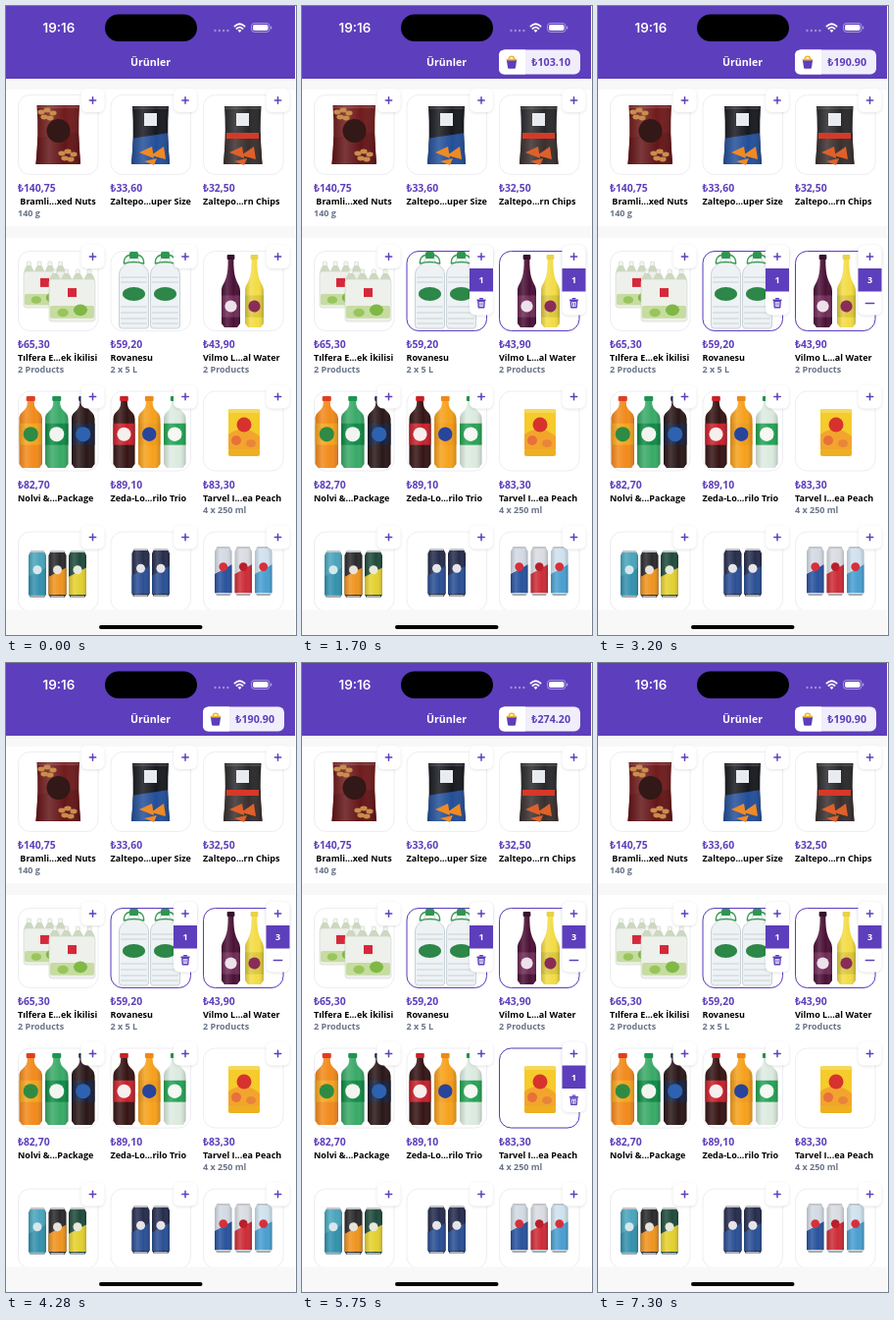
Animation, 296 px wide and 640 px high, one loop 8000 ms. Source, as an HTML page:

```html
<!DOCTYPE html>
<html lang="tr">
<head>
<meta charset="utf-8">
<style>
html, body { margin: 0; width: 100%; height: 100%; overflow: hidden; background: #fff; }
svg { display: block; width: 296px; height: 640px; }
text { font: 700 9px "Open Sans", "Noto Sans", sans-serif; }
.price { font-size: 10.4px; fill: #5d3ebc; }
.title { font-size: 10.6px; fill: #fff; }
.total { font-size: 10.7px; text-anchor: end; }
.sub { fill: #697488; }
.clock { font: 600 13.4px Inter, sans-serif; fill: #fff; }
.mid { text-anchor: middle; }
.lift { filter: drop-shadow(0 1px 1.5px #0000001c); }
</style>
</head>
<body>
<svg viewBox="0 0 296 640"><g id="page"></g><g id="cart"></g></svg>
<script>
const PURPLE = '#5d3ebc', PALE = '#f8f8f9';
const LOOP = 8000, WIDTH = 295;
const COLS = [12, 106.5, 201], ROWS = [90, 249, 391.5, 534.5];

const rect = (x, y, w, h, fill, r = 0, more = '') =>
  `<rect x="${x}" y="${y}" width="${w}" height="${h}" rx="${r}" fill="${fill}" ${more}/>`;
const oval = (x, y, rx, ry, fill) =>
  `<ellipse cx="${x}" cy="${y}" rx="${rx}" ry="${ry}" fill="${fill}"/>`;
const path = (d, fill, more = '') => `<path d="${d}" fill="${fill}" ${more}/>`;
const line = (d, color, w, more = '') =>
  path(d, 'none', `stroke="${color}" stroke-width="${w}" stroke-linecap="round" ${more}`);
const text = (x, y, s, cls) => `<text x="${x}" y="${y}" class="${cls}">${s}</text>`;

// Soft sheen laid over a shape's own colour
const shaded = d => path(d, 'url(#sheen)');

// The shoulder is the part of the height at which the body reaches full width
function bottle(x, y, w, h, shoulder, body, label, cap, mark) {
  const c = x + w / 2, n = w * .15, r = x + w, b = y + h, s = y + h * shoulder;
  const d = `M${c - n} ${y + 4}V${y + h * .09}C${c - n} ${s - h * .1} ${x} ${s - h * .12} ${x} ${s}
    V${b - 4}L${x + 3} ${b}H${r - 3}L${r} ${b - 4}V${s}C${r} ${s - h * .12} ${c + n} ${s - h * .1} ${c + n} ${y + h * .09}V${y + 4}Z`;
  const top = s + h * .06, tall = h * .3;
  return path(d, body) + rect(x, top, w, tall, label) + shaded(d) +
    rect(c - n - 1, y, n * 2 + 2, 5, cap, 1) + oval(c, top + tall / 2, w * .32, w * .32, mark);
}
const soda = (x, w, ...colors) => bottle(x, 397, w, 73, .32, ...colors);
const slim = (x, ...colors) => bottle(x, 253, 19, 74, .5, ...colors);

function can(x, y, w, h, top, base, mark) {
  const b = y + h;
  const d = `M${x + 2} ${y}H${x + w - 2}L${x + w} ${y + 4}V${b - 3}L${x + w - 2} ${b}H${x + 2}L${x} ${b - 3}V${y + 4}Z`;
  return path(d, top) + path(`M${x} ${y + h * .55}L${x + w} ${y + h * .35}V${b - 3}H${x}Z`, base) + shaded(d) +
    rect(x + 2, y - 1, w - 4, 2, '#c3c6ca', .5) + rect(x + 2, b - 2, w - 4, 2, '#a9adb2', .5) +
    oval(x + w / 2, y + h * .4, w * .25, w * .25, mark);
}

function pouch(x, y, w, h, body, low) {
  const r = x + w, b = y + h;
  const d = `M${x + 1} ${y}H${r - 1}Q${r - 3} ${y + h / 2} ${r} ${b}Q${x + w / 2} ${b - 1} ${x} ${b}
    Q${x + 3} ${y + h / 2} ${x + 1} ${y}Z`;
  return path(d, body) + path(`M${x + 2} ${y + h * .55}L${r - 2} ${y + h * .46}L${r} ${b}H${x}Z`, low) +
    shaded(d) + line(`M${x + 2} ${y + 2}H${r - 2}`, '#ffffff40', 1);
}

function jug(x, y) {
  const d = `M${x + 11} ${y + 5}H${x + 19}C${x + 20} ${y + 15} ${x + 30} ${y + 13} ${x + 30} ${y + 24}
    V${y + 75}Q${x + 30} ${y + 78} ${x + 27} ${y + 78}H${x + 3}Q${x} ${y + 78} ${x} ${y + 75}
    V${y + 24}C${x} ${y + 13} ${x + 10} ${y + 15} ${x + 11} ${y + 5}Z`;
  const ribs = [26, 31, 56, 62, 68, 73].map(k => line(`M${x + 2} ${y + k}H${x + 28}`, '#c3ced4', .9)).join('');
  return path(d, '#eef2f4', 'stroke="#bcc8ce" stroke-width=".8"') + ribs +
    line(`M${x + 5} ${y + 12}Q${x + 4} ${y + 3} ${x + 15} ${y + 3}T${x + 25} ${y + 12}Q${x + 15} ${y + 9} ${x + 5} ${y + 12}`, '#3b9b55', 1.5) +
    rect(x + 10.5, y, 9, 7, '#2f9550', 1.5) + oval(x + 15, y + 43, 11.5, 7, '#2c8748');
}

function pack(x, y, w, h) {
  const bw = w / 4;
  let s = '';
  for (let i = 0; i < 4; i++) {
    const c = x + (i + .5) * bw;
    s += rect(c - 2, y, 4, 5, '#f4f4f0', 1, 'stroke="#c3cbbd" stroke-width=".5"') +
      path(`M${c - 2} ${y + 4}Q${c - bw / 2} ${y + 8} ${c - bw / 2} ${y + 14}h${bw}Q${c + bw / 2} ${y + 8} ${c + 2} ${y + 4}Z`, '#ccd8bf');
  }
  return s + rect(x, y + 10, w, h - 10, '#eef0eb', 3, 'stroke="#cfd5c9" stroke-width=".6"') +
    rect(x + 1, y + h * .7, w - 2, h * .24, '#c6dca0', 2) +
    oval(x + w * .68, y + h * .78, w * .15, h * .11, '#7fb845') +
    oval(x + w * .3, y + h * .83, w * .12, h * .08, '#98c55c') +
    rect(x + w / 2 - 4.5, y + h * .36, 9, 9, '#d5283a');
}

const nuts = (x, y) => [[0, 0], [6, -2], [12, 1], [3, 5], [9, 6]]
  .map(([a, b]) => oval(x + a, y + b, 3.6, 2.4, '#c98d4d')).join('');
const chips = (x, y, color) =>
  path(`M${x} ${y}l13 -6 2 12zM${x + 12} ${y + 3}l13 -9 2 13zM${x + 5} ${y + 9}l13 -3 -3 7z`, color);

const PHOTOS = [
  () => pouch(30.5, 101, 45.5, 60, '#701b1c', '#641517') + nuts(36, 108) + nuts(57, 150) + oval(53.5, 127, 12, 12, '#321817'),
  () => pouch(128, 102, 39, 59, '#17191f', '#234f99') + rect(141, 109, 13, 13, '#e8ebef') + chips(136, 149, '#ef8a25'),
  () => pouch(222, 102, 39.5, 59, '#29282b', '#39302f') + rect(235, 109, 13, 13, '#e8ebef') +
    rect(225, 129, 33, 6, '#d63928') + chips(228, 149, '#e0602a'),
  () => pack(18, 260, 43, 47) + pack(44, 268, 47, 53),
  () => jug(115.5, 250) + jug(147.5, 250),
  () => slim(220, '#4a1036', '#6f2a55', '#35142b', '#ede2eb') + slim(244, '#f3dc45', '#dcc83c', '#e9d24a', '#8a2c58'),
  () => soda(13.5, 23.5, '#f28a1c', '#f6a41d', '#e23c22', '#2f8b43') +
    soda(40, 23.5, '#3aaa68', '#0f8a45', '#1e9553', '#f2f5ef') +
    soda(67, 23.5, '#2a1718', '#17203a', '#1c2d52', '#2d62b2'),
  () => soda(109.5, 22, '#351414', '#c9202a', '#ca2026', '#f7eeee') +
    soda(135, 22.5, '#f6a11c', '#f39a18', '#ef8818', '#27459b') +
    soda(161, 22.5, '#dcebe0', '#25a354', '#24974a', '#f6f8f3'),
  () => rect(227, 411, 32, 47, '#f6cb2c', 3) + path('M227 436Q243 424 259 438V451H227Z', '#f2a52d') +
    oval(235, 442, 5, 5, '#e8703a') + oval(250, 445, 5, 4, '#e8853a') +
    rect(227, 451, 32, 7, '#eeb021', 2) + rect(226.5, 410, 33, 4, '#f4d95c', 2) + oval(243, 426, 7.5, 7.5, '#d8322e'),
  () => can(23, 555, 18, 47, '#4aa5bd', '#3391ad', '#d8e8ec') + can(43.5, 555, 18, 47, '#2a2a2d', '#f0941f', '#e8e3da') +
    can(64, 555, 18, 47, '#204a3b', '#e4d02f', '#e7eadb'),
  () => [128.5, 149].map(x => can(x, 553, 18, 48, '#262d4c', '#2a4f94', '#e7e5e9')).join(''),
  () => can(213, 551, 17.5, 49, '#d3dae4', '#28539e', '#d7303b') + can(233.5, 551, 17.5, 49, '#d9dde3', '#cd2c37', '#b91f2c') +
    can(254, 551, 17.5, 49, '#cfe2ee', '#4a9fd0', '#d7303b')
];

const GOODS = [
  ['140,75', '&#160;Bramli...xed Nuts', '140 g'], ['33,60', 'Zaltepo...uper Size'], ['32,50', 'Zaltepo...rn Chips'],
  ['65,30', 'Tılfera E...ek İkilisi', '2 Products'], ['59,20', 'Rovanesu', '2 x 5 L'], ['43,90', 'Vilmo L...al Water', '2 Products'],
  ['82,70', 'Nolvi &amp;...Package'], ['89,10', 'Zeda-Lo...rilo Trio'], ['83,30', 'Tarvel I...ea Peach', '4 x 250 ml']
];

const plus = (x, y) => line(`M${x - 3.2} ${y}h6.4M${x} ${y - 3.2}v6.4`, PURPLE, 1.5);
const spot = i => [COLS[i % 3], ROWS[i / 3 | 0]];
const frame = (x, y, color) =>
  rect(x + .5, y + .5, 81.5, 81, 'none', 12, `stroke="${color}" stroke-width="1"`);

function product(i) {
  const [x, y] = spot(i), [price, name, sub] = GOODS[i] || [];
  let s = frame(x, y, '#eeedf2') + PHOTOS[i]() +
    rect(x + 64.5, y - 6, 24, 24, '#fff', 6, 'class="lift"') + plus(x + 76.5, y + 6);
  if (price) s += text(x, y + 99, '₺' + price, 'price') + text(x, y + 112, name, '');
  if (sub) s += text(x, y + 124, sub, 'sub');
  return s;
}

function header() {
  const dots = [213.5, 217.8, 222.1, 226.4].map(x => oval(x, 25, 1.2, 1.2, '#ffffff66')).join('');
  const wifi = line('M233.4 20.6Q238.5 15.8 243.6 20.6M235.4 23Q238.5 20.2 241.6 23', '#fff', 1.8) +
    path('M238.5 27l-2 -2.3q2 -1.4 4 0z', '#fff');
  const battery = rect(250.5, 17.5, 18.5, 9, 'none', 3, 'stroke="#ffffff80" stroke-width=".9"') +
    rect(252, 19, 15.5, 6, '#fff', 1.8) + rect(270, 20.5, 1.2, 3, '#ffffff80', .6);
  return rect(0, 0, WIDTH, 74, PURPLE) + rect(101, 8.5, 94, 27.5, '#000', 13.75) +
    text(37.6, 27, '19:16', 'clock') + dots + wifi + battery + text(147.5, 61, 'Ürünler', 'title mid');
}

function stepper(i, count) {
  const [x0, y0] = spot(i), x = x0 + 64.5, y = y0 - 6, c = x + 12;
  const trash = line(`M${c - 4} ${y + 56.2}h8M${c - 1.4} ${y + 54.6}h2.8`, PURPLE, 1.4) +
    path(`M${c - 3.2} ${y + 57.6}h6.4l-.5 6.2h-5.4z`, 'none', `stroke="${PURPLE}" stroke-width="1.4" stroke-linejoin="round"`) +
    line(`M${c - 1} ${y + 59.4}v2.6M${c + 1} ${y + 59.4}v2.6`, PURPLE, .9);
  return frame(x0, y0, PURPLE) + rect(x, y, 24, 71.5, '#fff', 6, 'class="lift"') + plus(c, y + 12) +
    rect(x, y + 24, 24, 23.5, PURPLE) + `<g fill="#fff">${text(c, y + 39, count, 'mid')}</g>` +
    (count > 1 ? line(`M${c - 4.2} ${y + 59.5}h8.4`, PURPLE, 1.5) : trash);
}

function basket(total) {
  const x = total.length > 5 ? 201 : 207, b = x + 13;
  return rect(x, 44.5, 284 - x, 25, '#f1eefb', 6) +
    path(`M${x + 27} 44.5H${x + 6}q-6 0 -6 6v13q0 6 6 6H${x + 27}z`, '#fff') +
    line(`M${b - 2.6} 55v-1.2q0 -2.6 2.6 -2.6t2.6 2.6V55`, '#f0b429', 1.5) +
    path(`M${b - 5.2} 54.5h10.4l-1.2 8q-.2 1.2 -1.4 1.2h-5.2q-1.2 0 -1.4 -1.2z`, PURPLE) +
    rect(b - 5.2, 53.8, 10.4, 1.6, '#f0b429', .8) +
    `<g fill="${PURPLE}">${text(274, 61, '₺' + total, 'total')}</g>`;
}

// Start time, basket total, then the count of each product index
const STEPS = [
  [0, '', {}],
  [500, '59.20', {4: 1}],
  [1700, '103.10', {4: 1, 5: 1}],
  [2290, '147.00', {4: 1, 5: 2}],
  [3200, '190.90', {4: 1, 5: 3}],
  [5000, '274.20', {4: 1, 5: 3, 8: 1}],
  [6250, '190.90', {4: 1, 5: 3}]
];

const page = document.getElementById('page'), cart = document.getElementById('cart');
page.innerHTML = `<defs><linearGradient id="sheen">
  <stop offset="0" stop-color="#000" stop-opacity=".15"/><stop offset=".3" stop-color="#fff" stop-opacity=".15"/>
  <stop offset=".65" stop-color="#fff" stop-opacity="0"/><stop offset="1" stop-color="#000" stop-opacity=".18"/>
  </linearGradient></defs>` +
  rect(0, 0, 296, 640, '#fff') + rect(0, 73, WIDTH, 12, PALE) + rect(0, 224, WIDTH, 12, PALE) +
  PHOTOS.map((_, i) => product(i)).join('') + header() +
  rect(0, 614.5, WIDTH, 26, PALE) + rect(95, 630, 105.5, 4, '#000', 2);

let shown;
function draw() {
  const t = performance.now() % LOOP, step = STEPS.findLast(s => s[0] <= t);
  if (step !== shown) {
    const [, total, counts] = shown = step;
    cart.innerHTML = total && basket(total) + Object.entries(counts).map(([i, n]) => stepper(+i, n)).join('');
  }
  requestAnimationFrame(draw);
}
draw();
</script>
</body>
</html>
```
